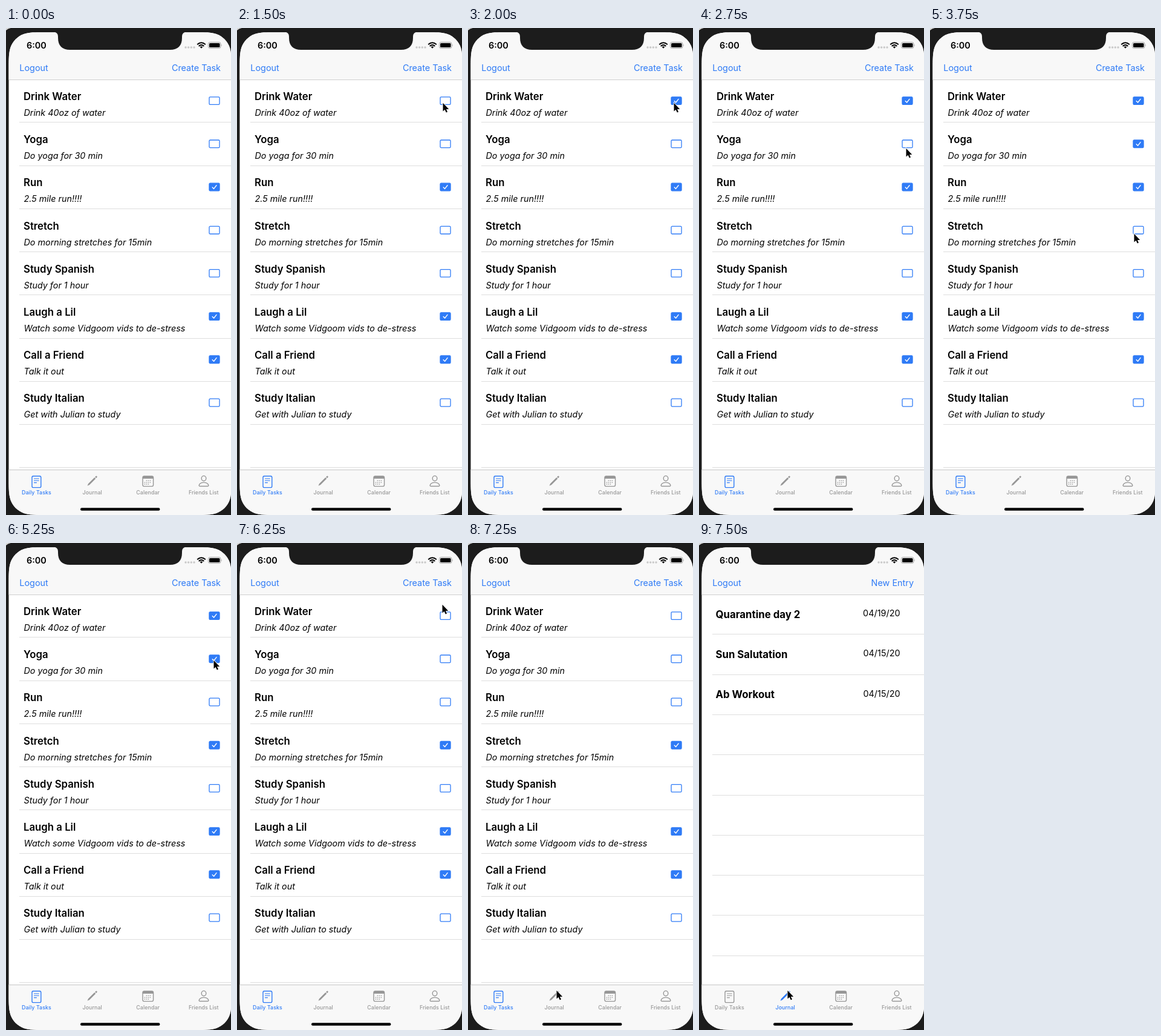
Write an HTML page that moves like this. It is 372x804 px and loops after 8 s.

```html
<!DOCTYPE html>
<html lang="en">
<head>
<meta charset="utf-8">
<title>Daily tasks</title>
<style>
  html, body { margin: 0; width: 100%; height: 100%; overflow: hidden; background: #1c1c1c; }
  svg { display: block; width: 372px; height: 804px; }
  text { font-family: Inter, "Liberation Sans", sans-serif; font-size: 14.4px; fill: #000; }
  .link { fill: #2f7bf6; }
  .end { text-anchor: end; }
  .title { font-size: 16.75px; font-weight: 600; }
  .entry { font-size: 16.8px; font-weight: 700; }
  .note { font-size: 14.35px; font-style: italic; }
  .clock { font-size: 14.4px; font-weight: 600; }
  .tab { color: #979797; }
  .tab.on { color: #2f7bf6; }
  .tab text { font-size: 8.8px; font-weight: 500; letter-spacing: .1px; text-anchor: middle; fill: currentColor; }
  .tab .line { fill: none; stroke: currentColor; stroke-width: 1.4; stroke-linecap: round; stroke-linejoin: round; }
  .tab .thin { stroke-width: 1.1; }
  .tab .dots { stroke-width: 1.6; stroke-dasharray: .1 2.9; }
  .tab .solid { fill: currentColor; }
  .box rect { fill: none; stroke: #2f7bf6; stroke-width: 1.3; }
  .box path { fill: none; stroke: #fff; stroke-width: 1.4; stroke-linecap: round; stroke-linejoin: round; visibility: hidden; }
  .box.on rect { fill: #2f7bf6; }
  .box.on path { visibility: visible; }
</style>
</head>
<body>
<svg viewBox="0 0 372 804">
  <defs>
    <clipPath id="screen"><path id="outline"/></clipPath>
  </defs>
  <rect width="372" height="804" fill="#1c1c1c"/>
  <path d="M0 0H8Q3 1 0 4Z" fill="#d8d8d8"/>

  <g clip-path="url(#screen)">
    <rect width="372" height="804" fill="#fff"/>
    <rect width="372" height="85" fill="#f8f8f8"/>
    <rect y="85" width="372" height="1" fill="#cfcfcf"/>
    <g id="tasks"></g>
    <g id="journal"></g>
    <rect y="729" width="372" height="75" fill="#f8f8f8"/>
    <rect y="729" width="372" height="1" fill="#c6c6c6"/>
  </g>

  <path d="M78 6Q86 7 86 14V16Q86 36 106 36H271Q291 36 291 16V14Q291 7 299 6Z" fill="#1c1c1c"/>

  <text class="clock" x="34" y="34">6:00</text>
  <g fill="#c9c9c9">
    <circle cx="297" cy="32" r="1.7"/><circle cx="301.7" cy="32" r="1.7"/>
    <circle cx="306.3" cy="32" r="1.7"/><circle cx="311" cy="32" r="1.7"/>
  </g>
  <g fill="none" stroke="#000" stroke-width="2">
    <path d="M316.2 27.3Q323 21.2 329.8 27.3M318.7 29.9Q323 26.2 327.3 29.9"/>
    <path d="M320.7 31.2Q323 29.4 325.3 31.2L323 33.7Z" fill="#000" stroke="none"/>
  </g>
  <rect x="334.5" y="23.5" width="20.5" height="10" rx="2.8" fill="none" stroke="#a2a2a2"/>
  <rect x="336" y="25" width="17.5" height="7" rx="1.5"/>
  <path d="M356.2 27Q357.8 28.5 356.2 30Z" fill="#a2a2a2"/>

  <text class="link" x="22.3" y="70.5">Logout</text>
  <text class="link end" id="action" x="355" y="70.5"></text>

  <g class="tab" id="tabTasks">
    <rect class="line" x="43" y="739.8" width="14.8" height="18.8" rx="2.2"/>
    <path class="line thin" d="M46.5 744H54.3M46.5 747.3H54.3M46.5 750.6H50.5"/>
    <text x="50.5" y="770">Daily Tasks</text>
  </g>
  <g class="tab" id="tabJournal">
    <path class="solid" d="M134.5 755.7L136 752.2L146.3 742L148.3 744L138 754.2ZM147.1 741.2L148.6 739.8Q149.6 739 150.4 739.9Q151.2 740.8 150.4 741.7L149.1 743.2Z"/>
    <text x="142.7" y="770">Journal</text>
  </g>
  <g class="tab">
    <rect class="line" x="226" y="740" width="17.6" height="16.6" rx="2.4"/>
    <path class="solid" d="M226 744V741.5Q226 739.5 228.5 739.5H241Q243.6 739.5 243.6 741.5V744Z"/>
    <path class="line dots" d="M232.4 747.3H241M229.4 750.2H241M229.4 753.1H238"/>
    <text x="234.7" y="770">Calendar</text>
  </g>
  <g class="tab">
    <ellipse class="line" cx="327" cy="743.6" rx="3.8" ry="4.2"/>
    <path class="line" d="M320.8 756.5Q319 756.5 319.2 754.8Q320.5 750.4 327 750.4Q333.5 750.4 334.8 754.8Q335 756.5 333.2 756.5Z"/>
    <text x="326.8" y="770">Friends List</text>
  </g>
  <rect x="123" y="792.3" width="131.5" height="4.4" rx="2.2"/>

  <g id="pointer">
    <path d="M.5 .8V14.6L3.6 11.7L5.8 16.6L8 15.6L5.9 10.9H10.2Z" stroke="#fff" stroke-width="1.6" paint-order="stroke"/>
  </g>
</svg>

<script>
  const LOOP = 8000, TICK = 250, JOURNAL_AT = 7500;
  const $ = id => document.getElementById(id);

  // title, note, checked at start, times of taps
  const tasks = [
    ["Drink Water", "Drink 40oz of water", 0, [1750, 6250]],
    ["Yoga", "Do yoga for 30 min", 0, [3000, 5500]],
    ["Run", "2.5 mile run!!!!", 1, [4750]],
    ["Stretch", "Do morning stretches for 15min", 0, [4000]],
    ["Study Spanish", "Study for 1 hour", 0, []],
    ["Laugh a Lil", "Watch some Vidgoom vids to de-stress", 1, []],
    ["Call a Friend", "Talk it out", 1, []],
    ["Study Italian", "Get with Julian to study", 0, []]
  ];
  const entries = [
    ["Quarantine day 2", "04/19/20"],
    ["Sun Salutation", "04/15/20"],
    ["Ab Workout", "04/15/20"]
  ];

  // pointer path: time, x, y
  const path = [
    [500, 203, 248], [750, 283, 165], [1000, 350, 118], [1500, 340, 123],
    [2000, 340, 123], [2750, 342, 198], [3000, 342, 198], [3750, 337, 339],
    [4000, 337, 339], [4750, 343, 266], [5250, 343, 193], [5500, 342, 193],
    [6000, 340, 121], [6250, 339, 101], [6500, 339, 101], [6750, 290, 300],
    [7000, 170, 690], [7250, 146, 738], [8000, 146, 738]
  ];

  // rectangle whose corners ease into the sides
  function softRect(x, y, w, h, r) {
    const far = 1.53 * r, pull = 0.87 * r, a = 0.63 * r, b = 0.075 * r, c = 0.37 * r, d = 0.17 * r;
    const corner = [[0, far], [0, 1.09 * r], [0, pull], [b, a], [d, c], [c, d], [a, b], [pull, 0], [1.09 * r, 0], [far, 0]];
    const place = (flipX, flipY) => {
      const pts = corner.map(([u, v]) => [flipX ? x + w - u : x + u, flipY ? y + h - v : y + v]);
      if (flipX !== flipY) pts.reverse();
      return `${pts[0]}C${pts.slice(1).join(" ")}`;
    };
    return `M${place(false, false)}L${place(true, false)}L${place(true, true)}L${place(false, true)}Z`;
  }
  $("outline").setAttribute("d", softRect(4.5, 7, 368.3, 797, 39.5));

  const rules = (count, pitch) => Array.from({ length: count }, (_, i) =>
    `<rect x="22" y="${Math.round(84 + pitch * (i + 1))}" width="350" height="1" fill="#dedede"/>`).join("");

  $("tasks").innerHTML = rules(9, 71.25) + tasks.map(([title, note], i) => {
    const y = 71.2 * i;
    return `<text class="title" x="29" y="${119 + y}">${title}</text>
      <text class="note" x="29.5" y="${145 + y}">${note}</text>
      <g class="box" transform="translate(336 ${113.8 + y})">
        <rect width="17" height="12.6" rx="1.6"/><path d="M5.2 6.7L7.6 9.2L12 3.6"/>
      </g>`;
  }).join("");

  $("journal").innerHTML = rules(9, 66.3) + entries.map(([title, date], i) => {
    const y = 66.3 * i;
    return `<text class="entry" x="27.5" y="${123.7 + y}">${title}</text>
      <text class="end" x="332.5" y="${121 + y}">${date}</text>`;
  }).join("");

  const boxes = document.querySelectorAll(".box");
  const show = (el, on) => { el.style.display = on ? "" : "none"; };

  function pointAt(t) {
    const i = Math.max(1, path.findIndex(p => p[0] > t));
    const [a, b] = [path[i - 1], path[i]];
    const k = (t - a[0]) / (b[0] - a[0]);
    return [1, 2].map(n => Math.round(a[n] + (b[n] - a[n]) * k));
  }

  function draw(ms) {
    const t = Math.floor(ms % LOOP / TICK) * TICK;
    const journal = t >= JOURNAL_AT;
    show($("tasks"), !journal);
    show($("journal"), journal);
    $("action").textContent = journal ? "New Entry" : "Create Task";
    $("tabTasks").classList.toggle("on", !journal);
    $("tabJournal").classList.toggle("on", journal);
    tasks.forEach(([, , start, taps], i) => {
      const flips = taps.filter(at => t >= at).length;
      boxes[i].classList.toggle("on", (start + flips) % 2 === 1);
    });
    show($("pointer"), t >= path[0][0]);
    $("pointer").setAttribute("transform", `translate(${pointAt(t)})`);
  }

  const begin = performance.now();
  function loop() {
    draw(performance.now() - begin);
    requestAnimationFrame(loop);
  }
  loop();
</script>
</body>
</html>
```
